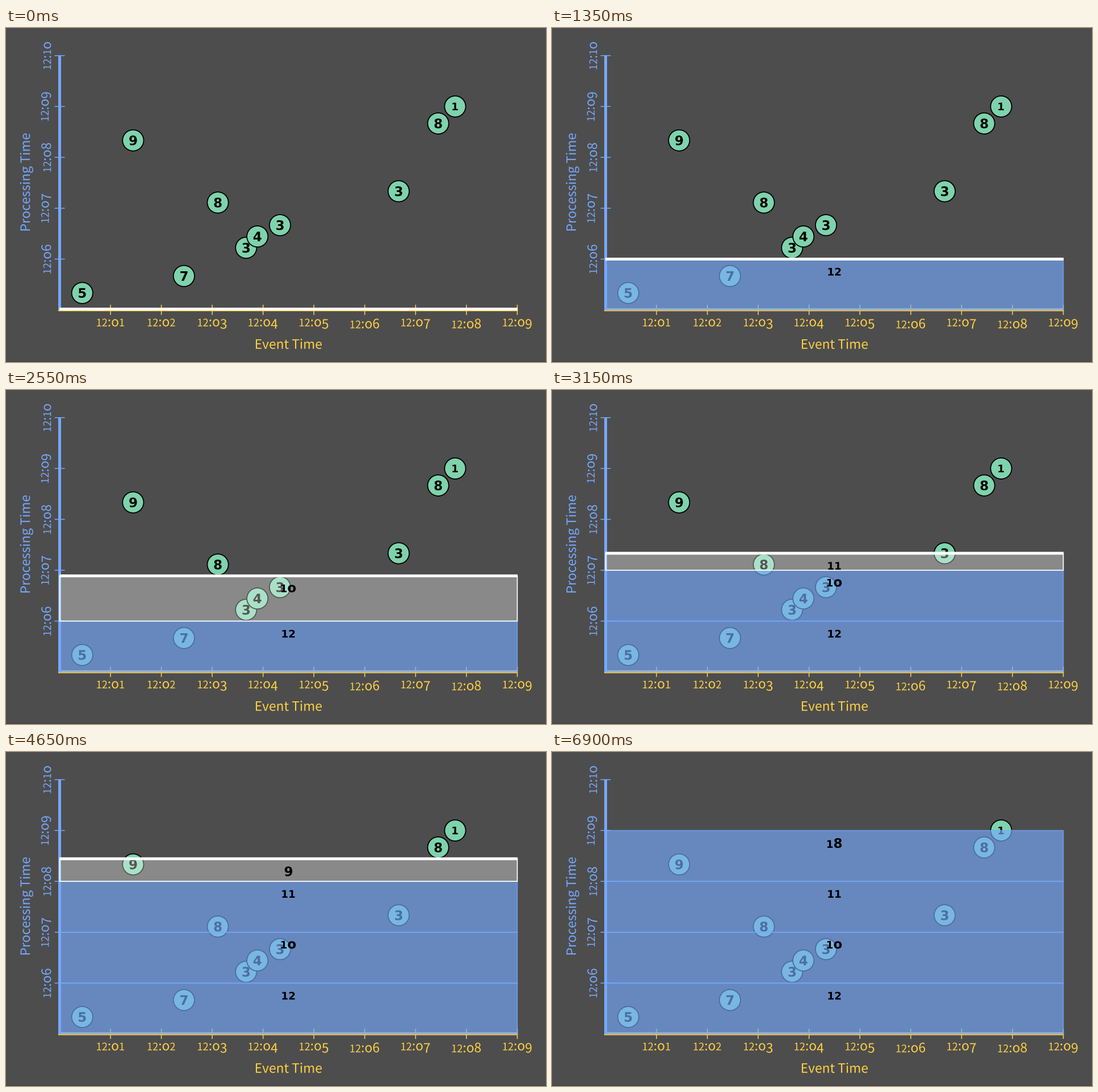
A matplotlib script for the animation above (9.9 s loop, 951x589 px).

```python
import matplotlib.pyplot as plt
from matplotlib.animation import FuncAnimation
from matplotlib.patches import Circle, PathPatch, Rectangle
from matplotlib.path import Path
from matplotlib.textpath import TextPath
from matplotlib.transforms import Affine2D

plt.rcParams["path.snap"] = False

W, H, DPI = 951, 589, 100
PX = 72 / DPI                      # one pixel in points
X0, Y0, XMIN, YMIN = 94.5, 497.2, 89.55, 89.7
STEPS = 9                          # frames per minute of processing time
FRAMES, STEP_MS = 66, 150
RIGHT = X0 + 9 * XMIN

BG, BLUE, YELLOW, GREEN = "#4d4d4d", "#76a8fe", "#ffd042", "#7ed3ac"
FONTS = {"normal": "Noto Sans CJK JP", "bold": "DejaVu Sans"}

# event time and processing time in ninths of a minute, value
EVENTS = [(4, 3, 5), (22, 6, 7), (33, 11, 3), (35, 13, 4), (39, 15, 3),
          (28, 19, 8), (60, 21, 3), (13, 30, 9), (67, 33, 8), (70, 36, 1)]


def px(step):
    return X0 + step * XMIN / STEPS


def py(step):
    return Y0 - step * YMIN / STEPS


def glyphs(text, size, weight="normal"):
    return TextPath((0, 0), text, size=size,
                    prop={"family": FONTS[weight], "weight": weight})


def advance(char, size, weight):
    return (glyphs(char + "l", size, weight).get_extents().x1
            - glyphs("l", size, weight).get_extents().x1)


def old_style(text, size, weight="normal"):
    """Figures with x-height 0, 1, 2 and hanging 3, 4, 5, 7, 9."""
    parts, x = [], 0
    for char in text:
        s = size * 0.8 if char in "12" else size
        drop = 0.18 * size if char in "34579" else 0
        char = "o" if char == "0" else char
        shape = glyphs(char, s, weight)
        parts.append(Affine2D().translate(x, -drop).transform_path(shape))
        x += advance(char, s, weight)
    return Path.make_compound_path(*parts)


def place(path, x, y, fx=0.5, fy=0.5, angle=0):
    """Put the point (fx, fy) of the path's box at (x, y)."""
    path = Affine2D().scale(1, -1).rotate_deg(-angle).transform_path(path)
    box = path.get_extents()
    dx = x - box.x0 - fx * box.width
    dy = y - box.y0 - fy * box.height
    return Affine2D().translate(dx, dy).transform_path(path)


fig = plt.figure(figsize=(W / DPI, H / DPI), dpi=DPI, facecolor=BG)
ax = fig.add_axes([0, 0, 1, 1])
ax.set_xlim(0, W)
ax.set_ylim(H, 0)
ax.axis("off")


def ink(path, color, z=1):
    return ax.add_patch(PathPatch(path, fc=color, lw=0, zorder=z))


def line(xs, ys, color, width, z=1):
    return ax.plot(xs, ys, color=color, lw=width * PX, zorder=z,
                   solid_capstyle="butt")[0]


# axes
line([0, W], [H - 0.5] * 2, "#3c3c3c", 1)
line([X0 - 2.5, RIGHT + 0.7], [496.9] * 2, YELLOW, 5)
line([X0] * 2, [py(45) - 0.7, Y0], BLUE, 5)
for m in range(1, 10):
    x = px(m * STEPS)
    line([x, x], [488, 506], YELLOW, 1.5)
    ink(place(old_style(f"12:{m:02}", 22.8), x, 512.5, fy=0), YELLOW)
for m in range(1, 6):
    y = py(m * STEPS)
    line([85.5, 103.5], [y, y], BLUE, 1.5)
    ink(place(old_style(f"12:{m + 5:02}", 22.8), 79.5, y, fx=1, angle=90),
        BLUE)
ink(place(glyphs("Event Time", 22.8), 498, 557), YELLOW)
ink(place(glyphs("Processing Time", 22.8), 24.5, 271.5, fx=0, angle=90), BLUE)

# events
for i, (ex, pt, value) in enumerate(EVENTS):
    z = 2 + i * 0.1
    ax.add_patch(Circle((px(ex), py(pt)), 18.6, fc=GREEN, ec="black",
                        lw=1.8 * PX, zorder=z))
    ink(place(old_style(str(value), 23, "bold"), px(ex), py(pt)),
        "black", z + 0.05)

# one box and one sum for each window
boxes = [ax.add_patch(Rectangle((X0, Y0), RIGHT - X0, 0, lw=1.7 * PX,
                                zorder=4 + i * 0.1)) for i in range(4)]
sums = [ink(Path([(0, 0)]), "black", 6) for _ in boxes]
sweep = line([X0 - 0.5, RIGHT + 0.5], [Y0] * 2, "white", 5, 5)
sum_paths = {}


def sum_path(total):
    if total not in sum_paths:
        sum_paths[total] = old_style(str(total), 23, "bold")
    return sum_paths[total]


def update(k):
    for i, (box, label) in enumerate(zip(boxes, sums)):
        start, end = i * STEPS, (i + 1) * STEPS
        now = min(k, end)
        total = sum(v for _, t, v in EVENTS if start < t <= now)
        box.set_visible(total > 0)
        label.set_visible(total > 0)
        if not total:
            continue
        top = py(now)
        box.set_y(top)
        box.set_height(py(start) - top)
        closed = k >= end
        box.set_facecolor((BLUE, 0.65) if closed else ("white", 0.34))
        box.set_edgecolor((BLUE, 0.75) if closed else "white")
        label.set_path(place(sum_path(total), 497.5, top + 22.2))
    sweep.set_visible(k <= 5 * STEPS)
    sweep.set_ydata([min(py(k), 495.7)] * 2)
    return [*boxes, *sums, sweep]


anim = FuncAnimation(fig, update, frames=FRAMES, interval=STEP_MS,
                     init_func=lambda: update(0), repeat=True, repeat_delay=0)
plt.show()
```
